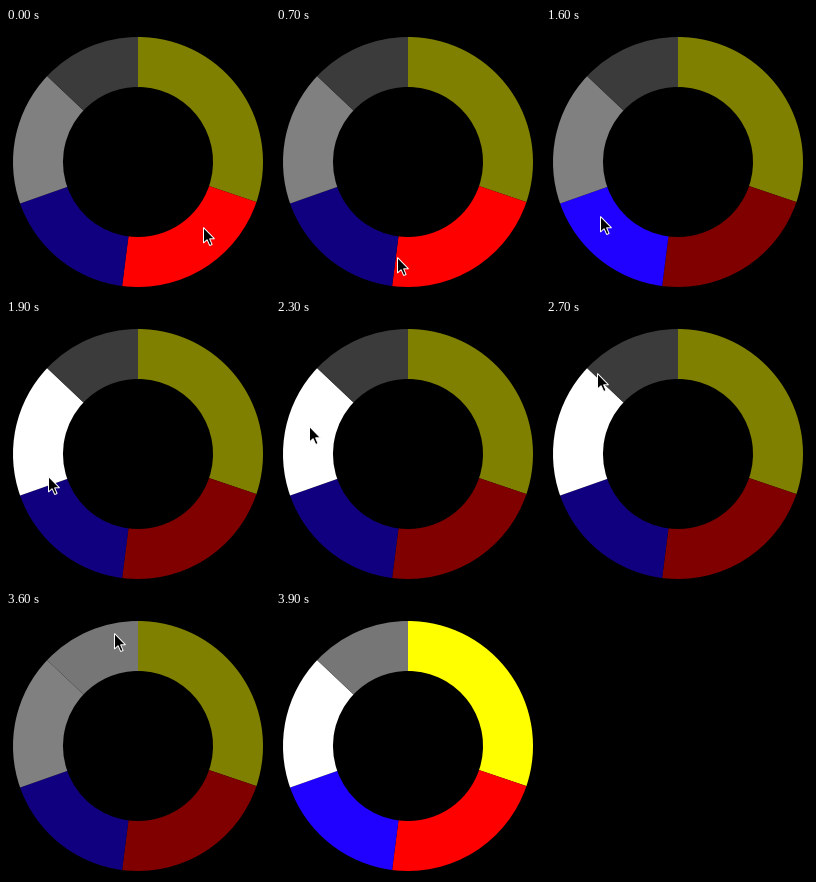
Write a matplotlib script that moves like this. It is 264 by 264 pixels and loops after 4 s.

```python
import numpy as np
import matplotlib.pyplot as plt
from matplotlib.animation import FuncAnimation
from matplotlib.patches import Polygon, Wedge

SIZE, DPI = 264, 100
FRAMES, INTERVAL = 40, 100
CENTER = np.array([132, 134])
OUTER, THICKNESS = 125, 50

# Bearings are degrees clockwise from the top.
EDGES = [0, 108.7, 187.3, 250.6, 313.4, 360]
BRIGHT = ["#ffff00", "#ff0000", "#2000ff", "#ffffff", "#767676"]
DIM = ["#808000", "#800000", "#100080", "#808080", "#3b3b3b"]
RED, BLUE, WHITE, GRAY, ALL = 1, 2, 3, 4, 5
HOVER = [(0, RED), (8, BLUE), (19, WHITE), (28, GRAY), (38, ALL)]

# Pointer path: frame, bearing, distance from the centre.
PATH = np.array([
    (0, 135, 92), (7, 186.6, 95.6), (11, 200.3, 98), (19, 256.3, 92.6),
    (27, 315, 114), (30, 339.7, 110), (31, 346.2, 109), (35, 346.2, 109),
    (36, 348, 115.5), (37, 349.7, 130), (38, 352, 165),
])
ARROW = np.array([(0, 0), (0, 15.5), (3.6, 12.2), (6.2, 18), (8.6, 17),
                  (6.1, 11.3), (11, 11.3)])

fig = plt.figure(figsize=(SIZE / DPI, SIZE / DPI), dpi=DPI, facecolor="black")
ax = fig.add_axes([0, 0, 1, 1])
ax.set_xlim(0, SIZE)
ax.set_ylim(SIZE, 0)
ax.axis("off")

segments = [
    ax.add_patch(Wedge(CENTER, OUTER, start - 90, end - 90,
                       width=THICKNESS, lw=0))
    for start, end in zip(EDGES, EDGES[1:])
]
pointer = ax.add_patch(Polygon(ARROW, facecolor="black", edgecolor="white",
                               lw=72 / DPI, joinstyle="miter", zorder=3))


def pointer_tip(frame):
    times, bearings, radii = PATH.T
    angle = np.radians(np.interp(frame, times, bearings))
    radius = np.interp(frame, times, radii)
    return CENTER + radius * np.array([np.sin(angle), -np.cos(angle)])


def draw(frame):
    active = [part for start, part in HOVER if start <= frame][-1]
    for i, segment in enumerate(segments):
        lit = active in (i, ALL)
        segment.set_facecolor(BRIGHT[i] if lit else DIM[i])
    pointer.set_xy(np.round(pointer_tip(frame)) + 0.5 + ARROW)
    return [*segments, pointer]


anim = FuncAnimation(fig, draw, frames=FRAMES, interval=INTERVAL,
                     repeat=True, repeat_delay=0, blit=False)
plt.show()
```
